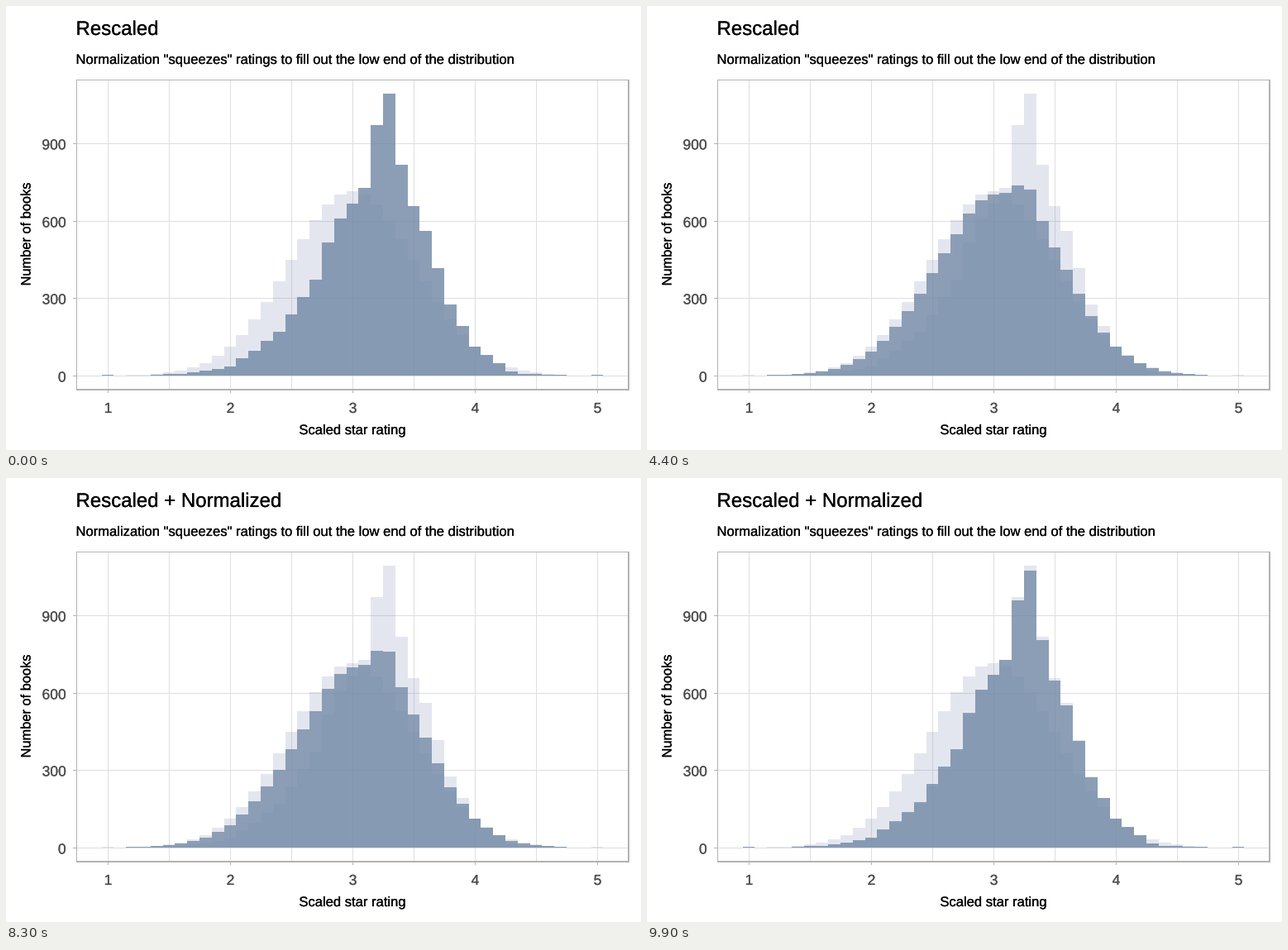
Recreate the animation shown at these times as a matplotlib script. Size 768 px wide and 537 px high, loop 10000 ms.

```python
import numpy as np
import matplotlib.pyplot as plt
from matplotlib.animation import FuncAnimation
from matplotlib.patches import Polygon, Rectangle
from matplotlib.patheffects import withStroke

W, H, DPI = 768, 537, 100
FRAMES, INTERVAL = 100, 100
STEPS = 25                      # frames per hold and per transition
PX = 72 / DPI                   # points per pixel

BAR = (118 / 255, 140 / 255, 168 / 255)
SHADOW = (120 / 255, 132 / 255, 178 / 255)
GRID, EDGE, LABEL = "#dedede", "#b3b3b3", "#4d4d4d"
BASE, UNIT = 447.45, 0.312      # pixel row of zero, pixels per book

# Ratings in tenths of a star, one bin each
TENTHS = np.arange(10, 51)

# Skewed histogram: key points (tenths, books) joined by straight lines
KEYS = [(14, 5), (16, 8), (18, 20), (20, 37), (22, 98), (24, 171), (25, 239),
        (27, 373), (28, 518), (29, 610), (31, 729), (32, 972), (33, 1094),
        (34, 819), (35, 658), (36, 562), (38, 277), (40, 113), (43, 17),
        (44, 8), (47, 4)]
RESCALED = np.interp(TENTHS, *zip(*KEYS), left=0, right=0)
RESCALED[[0, -1]] = 4           # lone books at both ends of the scale

# Bell curve around three stars
bell = 713 * np.exp(-((TENTHS - 30) / 10) ** 2 / (2 * 0.267)) + 3
NORMALIZED = np.where((TENTHS >= 12) & (TENTHS <= 47), bell, 0)

fig = plt.figure(figsize=(W / DPI, H / DPI), dpi=DPI, facecolor="white")
ax = fig.add_axes([0, 0, 1, 1])
ax.set_xlim(0, W)
ax.set_ylim(H, 0)
ax.axis("off")


def x_pos(rating):
    return 123 + 148 * (rating - 1)


def y_pos(count):
    return BASE - UNIT * count


def box(x, y, w, h, color, z):
    ax.add_patch(Rectangle((x, y), w, h, facecolor=color, lw=0,
                           antialiased=False, zorder=z))


def label(x, y, text, size, color="black", ha="left", **kw):
    return ax.text(x, y, text, fontsize=size * PX, color=color, ha=ha,
                   va="baseline", family="Liberation Sans", zorder=6,
                   path_effects=[withStroke(linewidth=0.2 * PX,
                                            foreground=color)], **kw)


EDGES = np.round(x_pos((np.arange(10, 52) - 0.5) / 10))
OUTLINE_X = np.repeat(EDGES, 2)


def outline(counts):
    tops = np.repeat(np.round(y_pos(counts)), 2)
    return np.column_stack([OUTLINE_X, np.concatenate([[447], tops, [447]])])


def histogram(counts, color, alpha, z):
    shape = Polygon(outline(counts), closed=True, facecolor=color, alpha=alpha,
                    lw=0, antialiased=False, zorder=z)
    ax.add_patch(shape)
    return shape


# Grid, ticks and tick labels
for rating in np.arange(1, 5.1, 0.5):
    col = int(x_pos(rating))
    box(col, 90, 1, 374, GRID, 1)
    if rating == int(rating):
        box(col, 465, 1, 3, EDGE, 4)
        label(col + 0.5, 492, str(int(rating)), 17.5, LABEL, "center")
for count in range(0, 901, 300):
    row = int(y_pos(count))
    box(86, row, 667, 1, GRID, 1)
    box(81, row, 4, 1, EDGE, 4)
    label(72.5, row + 7.5, str(count), 17.5, LABEL, "right")

# Panel border
box(85, 89, 669, 1, EDGE, 5)
box(85, 89, 1, 376, EDGE, 5)
box(752, 89, 2, 376, EDGE, 5)
box(85, 463, 669, 2, EDGE, 5)

title = label(84.5, 35, "Rescaled", 24)
label(84.5, 70, 'Normalization "squeezes" ratings to fill out '
      'the low end of the distribution', 16.6)
label(419.5, 518, "Scaled star rating", 16.6, ha="center")
label(29.5, 276, "Number of books", 16.4, ha="center", rotation=90,
      rotation_mode="anchor")

histogram(RESCALED, SHADOW, 0.2, 2)
histogram(NORMALIZED, SHADOW, 0.2, 2)
bars = histogram(RESCALED, BAR, 0.8, 3)


def draw(frame):
    # Hold, move to the bell curve, hold, move back
    mix = np.clip(min(frame - STEPS, FRAMES - frame) / STEPS, 0, 1)
    bars.set_xy(outline(RESCALED + mix * (NORMALIZED - RESCALED)))
    title.set_text("Rescaled" if frame <= 2 * STEPS
                   else "Rescaled + Normalized")
    return bars, title


anim = FuncAnimation(fig, draw, frames=FRAMES, interval=INTERVAL,
                     init_func=lambda: draw(0), repeat=True, repeat_delay=0,
                     blit=False)
plt.show()
```
